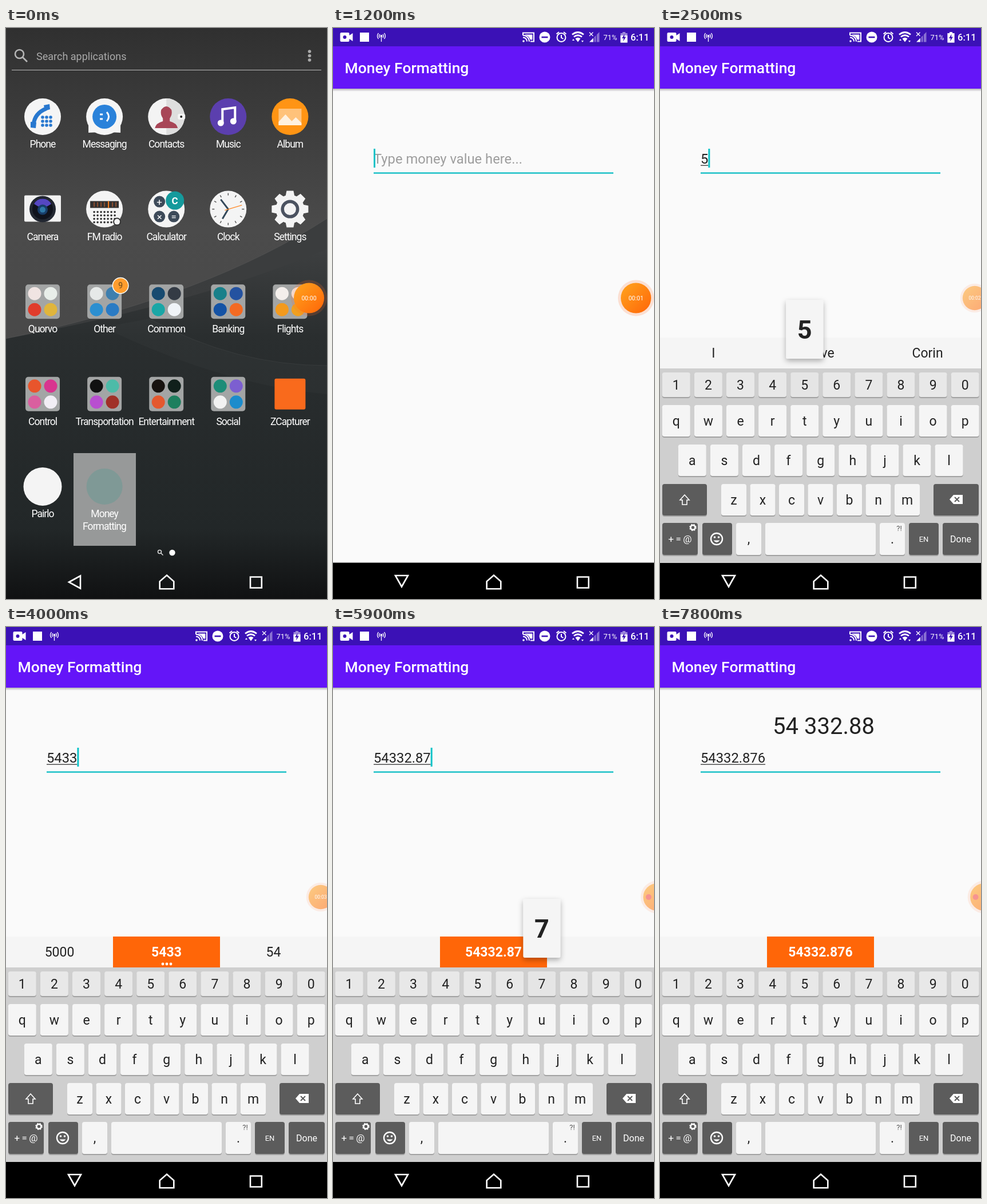
Recreate the animation shown at these times as an HTML page. Size 561 px wide and 998 px high, loop 8 s.

```html
<!DOCTYPE html>
<html lang="en">
<head>
<meta charset="utf-8">
<title>Money Formatting</title>
<style>
html, body { margin: 0; width: 561px; height: 998px; overflow: hidden; background: #000; }
svg { display: block; font-family: Roboto, "Liberation Sans", sans-serif; }
.mid { text-anchor: middle; }
.label { font-size: 17.5px; letter-spacing: -.055em; fill: #fff; text-anchor: middle; }
.field { font-size: 23.75px; }
.word { font-size: 23px; fill: #222; text-anchor: middle; }
.chosen { fill: #fff; font-weight: 700; }
.line { fill: none; stroke: #fff; stroke-width: 2.6; }
.thin { fill: none; stroke: #fff; stroke-width: 2; }
</style>
</head>
<body>
<svg id="stage" width="561" height="998" viewBox="0 0 561 998">
  <defs>
    <linearGradient id="sky" x2="0" y2="1">
      <stop offset="0" stop-color="#303030"/><stop offset=".35" stop-color="#4b4b4b"/>
      <stop offset=".6" stop-color="#484848"/>
    </linearGradient>
    <linearGradient id="hill" x2="0" y2="1">
      <stop offset="0" stop-color="#3d3f40"/><stop offset=".25" stop-color="#2a2e2f"/>
      <stop offset=".8" stop-color="#222728"/><stop offset="1" stop-color="#101112"/>
    </linearGradient>
    <linearGradient id="fire" x2="1" y2="1">
      <stop offset="0" stop-color="#ffa51e"/><stop offset="1" stop-color="#ff6508"/>
    </linearGradient>
    <linearGradient id="drop" x2="0" y2="1">
      <stop offset="0" stop-color="#000" stop-opacity=".28"/><stop offset="1" stop-color="#000" stop-opacity="0"/>
    </linearGradient>
    <filter id="soft" x="-40%" y="-30%" width="180%" height="160%">
      <feDropShadow dx="0" dy="4" stdDeviation="5" flood-opacity=".3"/>
    </filter>
    <clipPath id="aboveNav"><path d="M0 0h561v935H0z"/></clipPath>
  </defs>

  <g id="launcher">
    <path fill="url(#sky)" d="M0 0h561v998H0z"/>
    <path fill="#2d3032" opacity=".5" d="M0 543Q350 470 561 333V998H0z"/>
    <path fill="url(#hill)" d="M0 543Q340 480 561 386V998H0z"/>
    <path fill="#fff" opacity=".02" d="M250 508Q400 590 561 590V640Q380 625 170 523z"/>
    <path fill="none" stroke="#fff" opacity=".06" d="M0 543Q350 470 561 333M250 508Q400 590 561 590"/>
    <g fill="none" stroke="#b5b5b5" stroke-width="2.6"><circle cx="23.500" cy="45.500" r="7.500"/><path d="M29 51l8 8"/></g>
    <text x="53" y="55.500" font-size="18" fill="#aaa">Search applications</text>
    <path stroke="#bbb" d="M10 73.500H551"/>
    <g fill="#aaa"><circle cx="530.500" cy="41" r="2.800"/><circle cx="530.500" cy="48.500" r="2.800"/><circle cx="530.500" cy="56" r="2.800"/></g>
    <path fill="#979999" d="M118 743h109v162H118z"/>
    <g id="apps"></g>
    <g fill="none" stroke="#ddd" stroke-width="1.500"><circle cx="268.500" cy="915.500" r="3"/><path d="M271 918l3.500 3.500"/></g>
    <circle cx="290.500" cy="917" r="5.200" fill="#fff"/>
  </g>

  <g id="app">
    <path fill="#fafafa" d="M0 0h561v935H0z"/>
    <path fill="#fff" d="M0 930h561v5H0z"/>
    <g id="content">
      <path fill="url(#drop)" d="M0 106h561v5H0z"/>
      <path fill="#6415f8" d="M0 32h561v74H0z"/>
      <text x="20.500" y="79" font-size="26.500" font-weight="500" fill="#fff">Money Formatting</text>
      <text id="hint" class="field" x="71" y="237" fill="#9d9d9d">Type money value here...</text>
      <text id="typed" class="field" x="71" y="237" fill="#222"></text>
      <rect id="composing" x="71" y="239.500" height="1.300" fill="#333"/>
      <rect id="cursor" y="211" width="3" height="33" fill="#0cc3c8"/>
      <path fill="#1bc0c7" d="M71 252.200h419v2.600H71z"/>
      <text id="result" class="mid" x="286" y="187" font-size="40" fill="#222">54 332.88</text>
    </g>
    <rect id="statusBg" width="561" height="32" fill="#3b11b6"/>
    <g id="status" fill="#fff">
      <path d="M14.500 8h12q2 0 2 2v3l6-4v14l-6-4v3q0 2-2 2h-12q-2 0-2-2V10q0-2 2-2z"/>
      <circle cx="20.500" cy="16" r="3" fill="#3b11b6"/>
      <path d="M47 8h16v16H47z"/>
      <g fill="none" stroke="#fff" stroke-width="1.300"><path d="M84.500 16v8M82 11q-3 3 0 6M87 11q3 3 0 6M79.500 9q-4 5 0 10M89.500 9q4 5 0 10"/></g>
      <circle cx="84.500" cy="14" r="2"/>
      <path class="thin" d="M332 13V8.500h19v15h-6M332 16.500a7 7 0 0 1 7 7M332 12.800a11 11 0 0 1 11 11"/>
      <path d="M335.500 11.500h13v9h-3.500a14 14 0 0 0-9.500-8.500z"/>
      <circle cx="333" cy="23" r="1.800"/>
      <circle cx="370" cy="16" r="9.500"/><path fill="#3b11b6" d="M364.500 14.800h11v2.600h-11z"/>
      <circle class="thin" cx="399" cy="16.500" r="7.500"/>
      <path class="thin" d="M399 12v5l3.500 2M390.500 10.500l4.500-3.500M407.500 10.500l-4.500-3.500"/>
      <path class="thin" style="stroke-width:2.800" d="M418 11.500q10-8 20 0M421 15.500q7-5.500 14 0"/>
      <path d="M423.500 18.500q4.500-3.500 9 0l-4.500 6z"/><path d="M418 22l2-3 2 3zM434 22h4l-2 3z"/>
      <path d="M448 24.500l7-7v7z"/><path opacity=".4" d="M456.500 24.500V16l3-3v11.500zM461 24.500v-13l4.500-4.500v17.500z"/>
      <path class="thin" style="stroke-width:1.300" d="M448 7.500l6.500 6.500M454.500 7.500L448 14"/>
      <text x="472.500" y="21" font-size="13">71%</text>
      <path opacity=".5" d="M506 7h5v2h3.500v16.500H502.500V9h3.500z"/>
      <path id="charge"/>
      <path fill="#3b11b6" d="M509.500 10.500l-4.500 7.500h3l-1 5.500 5-8h-3z"/>
      <text x="520" y="22" font-size="16.500" font-weight="500">6:11</text>
    </g>
    <path fill="#000" d="M0 934.500h561V998H0z"/>
  </g>

  <g clip-path="url(#aboveNav)">
    <g id="keyboard">
      <path fill="#f5f5f5" d="M0 541h561v54H0z"/>
      <path id="pick" fill="#ff6608" d="M187 541h187v54H187z"/>
      <text class="word" x="93.500" y="576"></text>
      <text class="word" x="280.500" y="576"></text>
      <text class="word" x="467.500" y="576"></text>
      <g id="more" fill="#fff"><circle cx="274" cy="589" r="2.400"/><circle cx="281" cy="589" r="2.400"/><circle cx="288" cy="589" r="2.400"/></g>
      <path fill="#cfcfcf" d="M0 595h561v340H0z"/>
      <g id="keys"></g>
      <rect id="press" width="49" rx="4" opacity=".15"/>
    </g>
  </g>
  <g id="popup">
    <rect x="-32.500" width="65" height="103" rx="3" fill="#f5f5f5" filter="url(#soft)"/>
    <text class="mid" y="68" font-size="45" font-weight="700" fill="#222"></text>
  </g>

  <path id="back" class="line" d="M110 968.500L130 957.500V979.500z"/>
  <path id="down" class="line" d="M109 957H131L120 976.500z"/>
  <path class="line" d="M281 956.500l12.300 10.800v13h-24.600v-13z"/>
  <path class="line" d="M427 959.500h19.800v19H427z"/>

  <g id="bubble">
    <circle r="31.500" fill="#ff6a28" opacity=".19"/>
    <circle r="26.500" fill="url(#fire)"/>
    <text id="timer" class="mid" y="4" font-size="10.500" fill="#fff"></text>
    <circle id="dot" cx="-16" r="5.500" fill="#f4403c"/>
  </g>
</svg>
<script>
const $ = id => document.getElementById(id);
const show = (id, on) => $(id).style.display = on ? '' : 'none';
const clamp = v => Math.max(0, Math.min(1, v));
const ramp = (t, from, to) => clamp((t - from) / (to - from));
const easeOut = p => 1 - (1 - p) ** 3;
const mix = (a, b, p) => a + (b - a) * p;
const range = n => [...Array(n).keys()];

const circle = (x, y, r, fill) => `<circle cx="${x}" cy="${y}" r="${r}" fill="${fill}"/>`;
const ring = (x, y, r, w, dash = 'none') =>
  `<circle cx="${x}" cy="${y}" r="${r}" fill="none" stroke="#fff" stroke-width="${w}" stroke-dasharray="${dash}"/>`;
const path = (d, fill, stroke = 'none', w = 2) =>
  `<path d="${d}" fill="${fill}" stroke="${stroke}" stroke-width="${w}"/>`;
const disc = fill => circle(0, 0, 32, fill);
const at = (x, y, body) => `<g transform="translate(${x} ${y})">${body}</g>`;

// Launcher
const folder = colors => '<rect x="-30" y="-30" width="60" height="60" rx="5" fill="#a3a5a5"/>' +
  colors.split(' ').map((c, i) => circle(i % 2 ? 14 : -14, i < 2 ? -14 : 14, 11.5, '#' + c)).join('');

const dots = (cols, rows, gap, r, x, y, fill) => range(cols * rows).map(i =>
  circle(x + i % cols * gap, y + Math.floor(i / cols) * gap, r, fill)).join('');

const phone = disc('#f5f5f5') +
  path('M-16 14Q-14 -6 6 -14', 'none', '#2878cf', 7) +
  path('M-21 9l10 1-1 10-9-1zM2-20l10-2 1 9-9 3z', '#2878cf') + dots(3, 3, 7, 2.8, 0, 1, '#2878cf');
const messaging = disc('#f5f5f5') + path('M-28 8V28L-8 27zM28 8V28L8 27z', '#f5f5f5') +
  circle(0, 0, 21, '#2a82da') + path('M-8-4h5M-8 4h5M4-8Q11 0 4 8', 'none', '#fff', 3);
const contacts = disc('#f3f3f3') + path('M0-32A32 32 0 0 1 0 32z', '#dedede') +
  path('M-20 20Q-18 11-6 8V3Q-11-4-9-12 0-24 9-12 11-4 6 3V8Q18 11 20 20z', '#a84657') +
  '<rect x="20" y="-5" width="13" height="10" rx="3" fill="#f5f5f5"/>' + circle(26, 0, 2, '#222');
const music = disc('#5b3fae') + path('M-10 11V-13L12-16V8', 'none', '#fff', 4) +
  circle(-13, 11, 5.5, '#fff') + circle(9, 8, 5.5, '#fff');
const album = disc('#ff9414') + '<rect x="-20" y="-14" width="40" height="29" fill="#ffc27a"/>' +
  path('M-20 15V9L-8-4 3 8 10 1 20 11V15z', '#fff1df');
const camera = '<rect x="-32" y="-24" width="64" height="46" rx="2" fill="#f2f2f2"/>' +
  circle(0, 0, 23, '#222731') + circle(0, 0, 18, '#10131d') + path('M0 0L-15-9A17 17 0 0 1 15-9z', '#5547c2') +
  circle(0, 1, 9, '#183e6a') + circle(0, 1, 5, '#2e79a8');
const radio = disc('#f4f4f4') + path('M-25-14H25V-2H-25z', '#33302f') +
  path('M-18-12v8M-12-12v8M-6-12v8M0-12v8M14-12v8M20-12v8', 'none', '#a8582f', 1.5) +
  path('M7-14v12', 'none', '#ff8120', 2) + dots(7, 4, 6, 1.8, -18, 5, '#333') +
  circle(22, 22, 7, '#333') + circle(22, 22, 5, '#f4f4f4');
const calculator = disc('#f4f4f4') + [[-12, -13], [-12, 13], [13, 13]].map(([x, y], i) =>
  circle(x, y, 10, '#3d4a59') + `<text class="mid" x="${x}" y="${y + 6}" font-size="17" fill="#fff">${'+×='[i]}</text>`).join('') +
  circle(15, -15, 16, '#159a9c') + '<text class="mid" x="15" y="-9" font-size="17" font-weight="700" fill="#fff">C</text>';
const clock = disc('#f4f4f4') + range(12).map(i =>
  `<path stroke="#555" stroke-width="1.5" d="M0-28v4" transform="rotate(${i * 30})"/>`).join('') +
  path('M-13-17L0 0-10 17', 'none', '#34495a', 3) + path('M-6 2L24-7', 'none', '#ff8a2a', 1.5);
const settings = circle(0, 0, 25, '#f4f4f4') + range(8).map(i =>
  `<path fill="#f4f4f4" d="M-8-22L-6-32H6L8-22z" transform="rotate(${i * 45})"/>`).join('') +
  circle(0, 0, 16, '#4b5260') + circle(0, 0, 10.5, '#f4f4f4');
const badge = circle(28, -28, 14.5, '#fff') + circle(28, -28, 13, '#ff9d2e') +
  '<text class="mid" x="28" y="-23" font-size="14" fill="#6b4a1d">9</text>';

const apps = [
  ['Phone', phone], ['Messaging', messaging], ['Contacts', contacts], ['Music', music], ['Album', album],
  ['Camera', camera], ['FM radio', radio], ['Calculator', calculator], ['Clock', clock], ['Settings', settings],
  ['Quorvo', folder('f0e4e2 e8eee9 e03c2c e0b53c')],
  ['Other', folder('e6e9e8 3e7fae 2c8fd0 2a7bc4') + badge],
  ['Common', folder('174a70 343b45 1aa6a6 f0f4f8')],
  ['Banking', folder('19808a 2452a0 1553a5 f36a22')],
  ['Flights', folder('f4efec f4efec f39a1e f0a020')],
  ['Control', folder('e8552c d8358f d95f9f f2eef5')],
  ['Transportation', folder('111111 4dbba8 b84fd0 a03028')],
  ['Entertainment', folder('17120f 10201b e4582e 1d7f5e')],
  ['Social', folder('1d8d78 7c5fd0 f2f2f2 1c8ccc')],
  ['ZCapturer', '<rect x="-27" y="-27" width="54" height="54" rx="3" fill="#f96a1c"/>'],
  ['Pairlo', circle(0, 0, 33.5, '#f4f4f4')],
  ['Money', circle(0, 0, 31.5, '#7f9996')]
];
$('apps').innerHTML = apps.map(([name, icon], i) => {
  const x = 64 + i % 5 * 108.1, y = 155 + Math.floor(i / 5) * 161.6;
  return at(x, y, icon) + `<text class="label" x="${x}" y="${y + 54}">${name}</text>`;
}).join('') + '<text class="label" x="172" y="877">Formatting</text>';

// Keyboard
const key = (x, y, w, h, fill, text = '', size = 23, ink = '#222') =>
  `<rect x="${x}" y="${y + 2}" width="${w}" height="${h}" rx="4" fill="#000" opacity=".22"/>` +
  `<rect x="${x}" y="${y}" width="${w}" height="${h}" rx="4" fill="${fill}"/>` +
  `<text class="mid" x="${x + w / 2}" y="${y + h / 2 + size * .35}" font-size="${size}" fill="${ink}">${text}</text>`;
const row = (chars, x, step, y, w, h, fill) =>
  [...chars].map((c, i) => key(x + i * step, y, w, h, fill, c)).join('');
const light = '#f5f5f5', dark = '#5c5c5c';
$('keys').innerHTML =
  row('1234567890', 3.8, 56.1, 602, 49, 43, '#e8e8e8') +
  row('qwertyuiop', 3.8, 56.1, 659, 49, 55, light) +
  row('asdfghjkl', 31.8, 56.1, 728, 49, 55, light) +
  key(4, 797, 78, 55, dark) + row('zxcvbnm', 107, 50.5, 797, 44, 55, light) + key(478, 797, 79, 55, dark) +
  key(4, 865, 62, 56, dark, '+\u2009=\u2009@', 17, '#fff') + key(74, 865, 52, 56, dark) +
  key(133, 865, 44, 56, light, ',') + key(184, 865, 193, 56, light) + key(384, 865, 44, 56, light, '.') +
  key(435, 865, 52, 56, dark, 'EN', 13, '#fff') + key(494, 865, 63, 56, dark, 'Done', 16, '#fff') +
  path('M43 816l8 9h-4v8h-8v-8h-4z', 'none', '#fff', 1.6) +
  path('M506 824l7-8h16v16h-16z', '#fff') + path('M515 820l8 8M523 820l-8 8', 'none', dark, 2) +
  ring(99, 893, 10, 2.4) + circle(95.5, 890, 1.8, '#fff') +
  circle(102.5, 890, 1.8, '#fff') + path('M93.500 895.500h11q-5.500 7-11 0z', '#fff') +
  ring(57.5, 873, 4, 2.6) + ring(57.5, 873, 5.5, 1.6, 2.2) +
  '<text class="mid" x="418" y="879" font-size="13" fill="#555">?!</text>';

// time, character, hold
const strokes = [
  [2500, '5', 100], [2700, '4', 100], [2900, '3', 100], [3900, '3', 100], [4100, '2', 100],
  [5000, '.', 200], [5500, '8', 200], [5800, '7', 200], [6100, '6', 200]
];
const sideWords = [['I', 'Corin'], ['5 minutes', '50'], ['5000', '5'], ['5000', '54'], ['5000', '54'], ['54000', '5433']];
const charging = [900, 1500, 2600, 3100, 3600, 4100, 4700, 5200, 5700, 6200, 6700, 7200, 7700];
const ticks = [1100, 2300, 3400, 4500];
const words = document.querySelectorAll('.word');
const popupText = document.querySelector('#popup text');

const countBefore = (times, t) => times.filter(s => s <= t).length;
const textAt = t => strokes.filter(s => s[0] <= t).map(s => s[1]).join('');

function drawField(t) {
  const text = textAt(t);
  $('typed').textContent = text;
  show('hint', !text);
  const width = text ? $('typed').getComputedTextLength() : 0;
  $('composing').setAttribute('width', width);
  $('cursor').setAttribute('x', 71 + width);
  const reset = Math.max(...[200, 1300, ...strokes.map(s => s[0])].filter(s => s <= Math.max(t, 200)));
  show('cursor', Math.floor((t - reset) / 500) % 2 === 0);
  show('result', t >= 7200);
}

function drawKeyboard(t) {
  const p = easeOut(ramp(t, 1300, 1750));
  $('keyboard').style.opacity = p;
  $('keyboard').setAttribute('transform', `translate(0 ${mix(60, 0, p)})`);

  const text = textAt(t - 100);
  const sides = sideWords[text.length] || ['', ''];
  words[0].textContent = sides[0];
  words[1].textContent = text || 'have';
  words[2].textContent = sides[1];
  words[1].classList.toggle('chosen', !!text);
  show('pick', text);
  show('more', text && sides[0]);

  const hit = strokes.find(([s, , hold]) => t >= s && t < s + hold);
  const done = t >= 7100 && t < 7200;
  show('popup', hit);
  show('press', hit || done);
  const press = (x, y, w, h, o) => Object.entries({ x, y, width: w, height: h, opacity: o })
    .forEach(([k, v]) => $('press').setAttribute(k, v));
  if (done) press(494, 865, 63, 56, .3);
  if (!hit) return;
  const isDot = hit[1] === '.';
  const x = isDot ? 406 : 28.3 + (hit[1] - 1) * 56.1;
  popupText.textContent = hit[1];
  $('popup').setAttribute('transform', `translate(${x} ${isDot ? 738 : 475})`);
  if (isDot) press(384, 865, 44, 56, .05);
  else press(x - 24.5, 602, 49, 43, .01);
}

function drawBubble(t) {
  const dock = easeOut(ramp(t, 1650, 2000)), hide = easeOut(ramp(t, 5000, 5300));
  const x = mix(mix(529.5, 550, dock), 566, hide);
  const size = mix(mix(1, .8, dock), .9, hide);
  $('bubble').setAttribute('transform', `translate(${x} 472) scale(${size})`);
  $('bubble').style.opacity = mix(1, .55, dock);
  $('timer').textContent = '00:0' + countBefore(ticks, t);
  show('timer', t < 5150);
  show('dot', t >= 5150);
}

function draw(t) {
  const open = t >= 100;
  show('launcher', !open);
  show('app', open);
  const enter = ramp(t, 100, 350);
  $('statusBg').style.opacity = mix(.6, 1, enter);
  $('status').setAttribute('transform', `translate(0 ${mix(-3, 0, enter)})`);
  $('content').style.opacity = ramp(t, 200, 450);
  $('charge').setAttribute('d', countBefore(charging, t) % 2
    ? 'M502.500 13h12v12.500h-12z' : 'M506 7h5v2h3.500v16.500H502.500V9h3.500z');
  show('back', t < 1150);
  show('down', t >= 1150);
  drawField(t);
  drawKeyboard(t);
  drawBubble(t);
}

const start = performance.now();
function loop() {
  draw((performance.now() - start) % 8000);
  requestAnimationFrame(loop);
}
loop();
</script>
</body>
</html>
```
